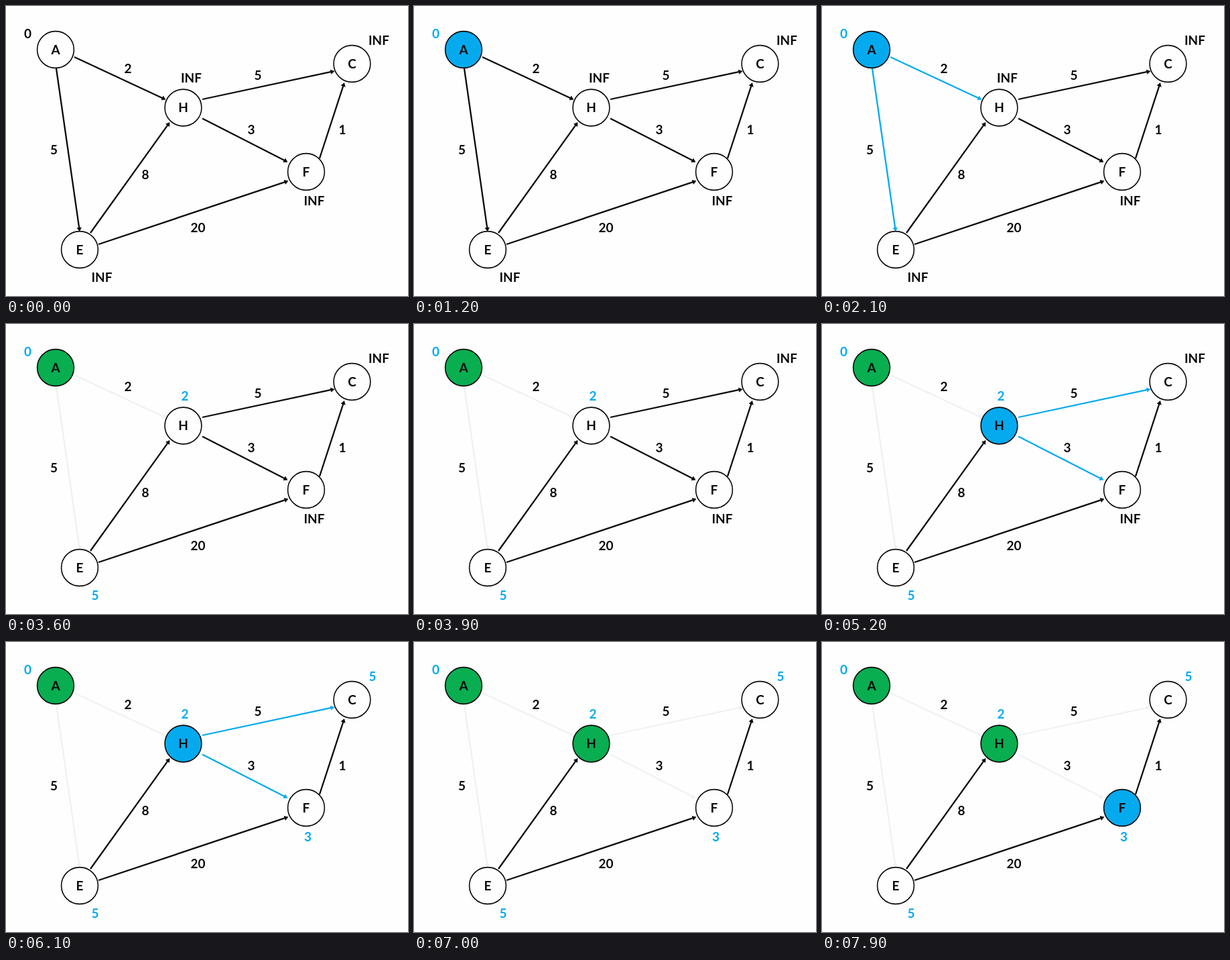
These frames come from a looping animation (600x432 px, 8 s). An HTML page:

```html
<!DOCTYPE html>
<html lang="en">
<head>
<meta charset="utf-8">
<title>Shortest path walk</title>
<style>
  html, body { margin: 0; width: 100%; height: 100%; overflow: hidden; background: #fefefe; }
  svg { display: block; width: 600px; height: 432px; }
  text { font: bold 19px Lato, Carlito, sans-serif; text-anchor: middle; }
</style>
</head>
<body>
<svg id="stage" viewBox="0 0 600 432"></svg>
<script>
const LOOP = 8000;
const BLACK = '#0a0a0c', WHITE = '#fefefe', BLUE = '#05aaee', GREEN = '#08ae50', FADED = '#f1f1f4';
const stage = document.getElementById('stage');

function add(tag, attrs, text) {
  const el = document.createElementNS('http://www.w3.org/2000/svg', tag);
  for (const key in attrs) el.setAttribute(key, attrs[key]);
  if (text !== undefined) el.textContent = text;
  return stage.appendChild(el);
}

// x and y mark the middle of the capital letters
const label = (text, x, y) => add('text', { x, y: y + 6.8, fill: BLACK }, text);

function paint(el, color) {
  el.setAttribute('fill', color);
}

// on: edge is being examined, off: edge is done
const edges = [
  { from: [102, 76], to: [238.5, 139.5], weight: ['2', 182, 93], on: 2100, off: 3600 },
  { from: [75, 93], to: [110, 336], weight: ['5', 71.5, 214.5], on: 2100, off: 3600 },
  { from: [126, 338], to: [244.5, 173], weight: ['8', 208, 251.5] },
  { from: [138, 355], to: [421.5, 260.5], weight: ['20', 286.5, 330.5] },
  { from: [293, 139], to: [490.5, 97], weight: ['5', 376, 103.5], on: 5200, off: 7000 },
  { from: [293, 167.5], to: [420.5, 232.5], weight: ['3', 366, 184.5], on: 5200, off: 7000 },
  { from: [468, 227], to: [505, 114], weight: ['1', 502, 184.5] }
];

// on: node is current, off: node is settled, known: distance appears
const nodes = [
  { name: 'A', x: 74, y: 65, start: '0', startAt: [32.5, 41], dist: '0', distAt: [32.5, 41], known: 1200, on: 1200, off: 3600 },
  { name: 'H', x: 264.5, y: 151.5, start: 'INF', startAt: [276.5, 107.5], dist: '2', distAt: [267, 107.5], known: 2900, on: 4400, off: 7000 },
  { name: 'C', x: 516.5, y: 86, start: 'INF', startAt: [556.5, 51.5], dist: '5', distAt: [547, 51.5], known: 6000 },
  { name: 'F', x: 448, y: 247, start: 'INF', startAt: [460, 290], dist: '3', distAt: [450.5, 290], known: 6000, on: 7700 },
  { name: 'E', x: 110, y: 363, start: 'INF', startAt: [143, 404.5], dist: '5', distAt: [133, 404.5], known: 2900 }
];

for (const edge of edges) {
  const [x1, y1] = edge.from, [x2, y2] = edge.to;
  const length = Math.hypot(x2 - x1, y2 - y1);
  const angle = Math.atan2(y2 - y1, x2 - x1) * 180 / Math.PI;
  edge.shape = add('path', {
    d: `M0-1.15H${length - 6}V-3.7L${length} 0L${length - 6} 3.7V1.15H0Z`,
    transform: `translate(${x1} ${y1}) rotate(${angle})`
  });
  label(...edge.weight);
}

for (const node of nodes) {
  node.circle = add('circle', { cx: node.x, cy: node.y, r: 27.4, stroke: BLACK, 'stroke-width': 1.6 });
  label(node.name, node.x, node.y);
  node.before = label(node.start, ...node.startAt);
  node.after = label(node.dist, ...node.distAt);
  paint(node.after, BLUE);
}

function phase(item, t, idle, active, done) {
  return t >= item.off ? done : t >= item.on ? active : idle;
}

function render(t) {
  for (const edge of edges) paint(edge.shape, phase(edge, t, BLACK, BLUE, FADED));
  for (const node of nodes) {
    paint(node.circle, phase(node, t, WHITE, BLUE, GREEN));
    const known = t >= node.known;
    node.before.setAttribute('visibility', known ? 'hidden' : 'visible');
    node.after.setAttribute('visibility', known ? 'visible' : 'hidden');
  }
}

const began = performance.now();
function tick() {
  render((performance.now() - began) % LOOP);
  requestAnimationFrame(tick);
}
tick();
</script>
</body>
</html>
```
